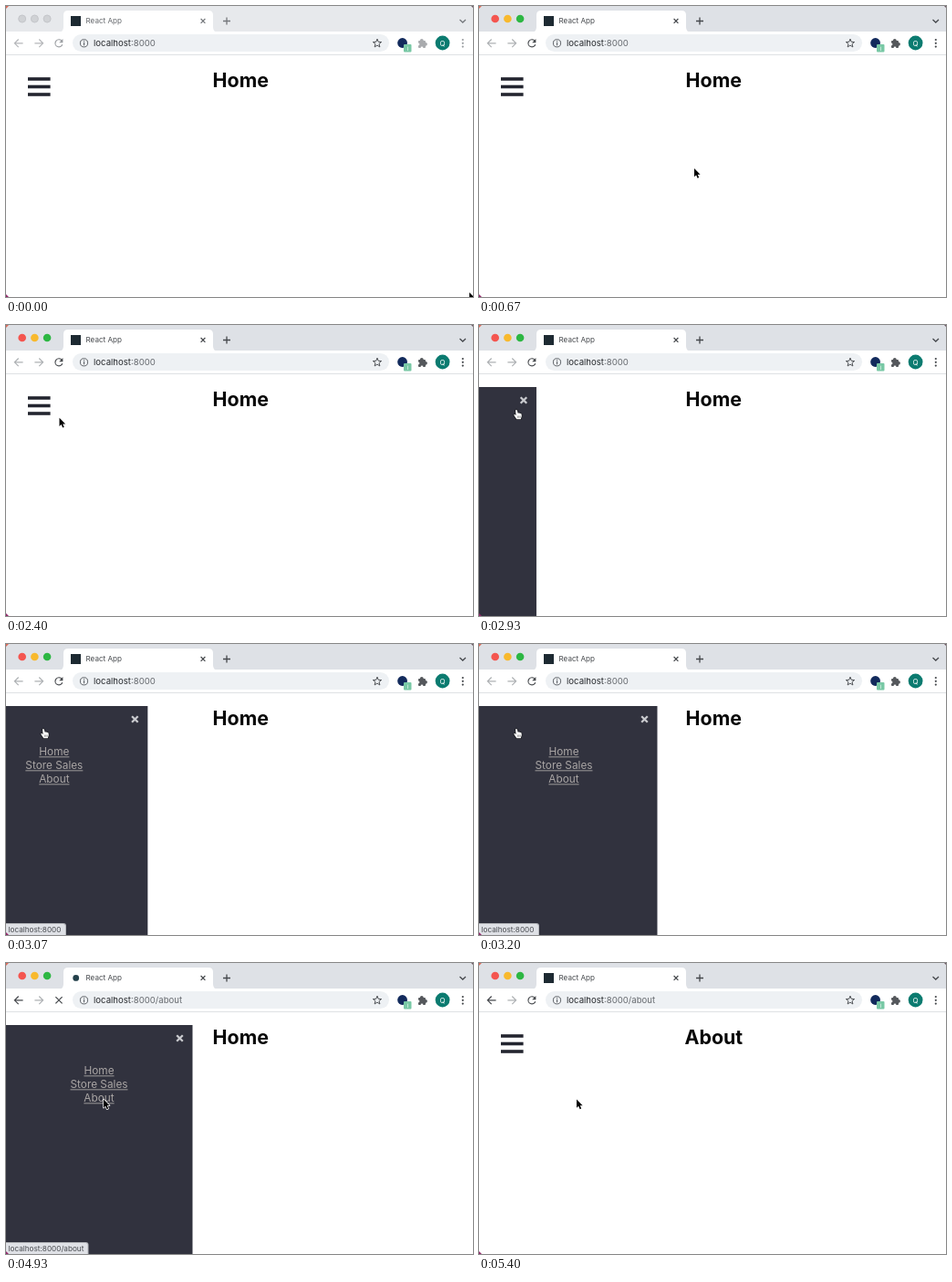
Animation of 512x319 px, one loop 6 s. Source, as an HTML page with a canvas:

```html
<!DOCTYPE html>
<html lang="en">
<head>
<meta charset="utf-8">
<title>Sidebar menu demo</title>
<style>
html, body { margin: 0; width: 100%; height: 100%; overflow: hidden; background: #fff; }
canvas { display: block; width: 512px; height: 319px; }
</style>
</head>
<body>
<canvas id="stage"></canvas>
<script>
const W = 512, H = 319, LOOP = 6000, STEP = 1000 / 15;
const FONT = 'Inter, "Open Sans", sans-serif';
const canvas = document.getElementById('stage');
const ctx = canvas.getContext('2d');
const dpr = window.devicePixelRatio || 1;
canvas.width = W * dpr;
canvas.height = H * dpr;

// Key times of the scene, in ms
const ACTIVE = 400, MENU_START = 2645, MENU_TIME = 670;
const CLICK = 4790, NAVIGATED = 4860, LOADED = 5130;

// Cursor stops: time, x, y of the hotspot
const cursorPath = [
  [267, 508, 314], [667, 236, 178], [1067, 236, 178], [1400, 210, 178],
  [1867, 210, 178], [2533, 41, 93], [3667, 41, 93], [3867, 105, 154],
  [4000, 107, 121], [4133, 107, 121], [4400, 107, 149.5], [6000, 107, 149.5]
];

// CSS "ease" curve
function ease(x) {
  if (x <= 0) return 0;
  if (x >= 1) return 1;
  let lo = 0, hi = 1;
  for (let i = 0; i < 24; i++) {
    const s = (lo + hi) / 2;
    if (0.75 * s * (1 - s) + s ** 3 < x) lo = s; else hi = s;
  }
  return 0.3 * lo * (1 - lo) ** 2 + 3 * lo * lo * (1 - lo) + lo ** 3;
}

function cursorAt(t) {
  if (t <= cursorPath[0][0]) return cursorPath[0].slice(1);
  const i = cursorPath.findIndex(stop => stop[0] >= t);
  const [t0, x0, y0] = cursorPath[i - 1], [t1, x1, y1] = cursorPath[i];
  const p = (t - t0) / (t1 - t0), k = p * p * (3 - 2 * p);
  return [x0 + (x1 - x0) * k, y0 + (y1 - y0) * k];
}

function rect(x, y, w, h, fill) {
  ctx.fillStyle = fill;
  ctx.fillRect(x, y, w, h);
}

function disc(x, y, r, fill) {
  ctx.beginPath();
  ctx.arc(x, y, r, 0, Math.PI * 2);
  ctx.fillStyle = fill;
  ctx.fill();
}

function ring(x, y, r, color, width) {
  ctx.beginPath();
  ctx.arc(x, y, r, 0, Math.PI * 2);
  ctx.strokeStyle = color;
  ctx.lineWidth = width;
  ctx.stroke();
}

function pill(x, y, w, h, radii, fill) {
  ctx.beginPath();
  ctx.roundRect(x, y, w, h, radii);
  ctx.fillStyle = fill;
  ctx.fill();
}

function lines(color, width, ...polylines) {
  ctx.strokeStyle = color;
  ctx.lineWidth = width;
  ctx.beginPath();
  for (const p of polylines)
    for (let i = 0; i < p.length; i += 2)
      i ? ctx.lineTo(p[i], p[i + 1]) : ctx.moveTo(p[0], p[1]);
  ctx.stroke();
}

function cross(x, y, r, color, width) {
  lines(color, width, [x - r, y - r, x + r, y + r], [x - r, y + r, x + r, y - r]);
}

function text(str, x, y, size, color, align = 'left', weight = 400) {
  ctx.font = `${weight} ${size}px ${FONT}`;
  ctx.textAlign = align;
  ctx.fillStyle = color;
  ctx.fillText(str, x, y);
  return ctx.measureText(str).width;
}

function drawTabStrip(active, loading) {
  rect(0, 0, W, 28, active ? '#dee1e6' : '#e7e9ec');
  const lights = active ? ['#f4554f', '#f8b92d', '#2db743'] : ['#d0d2d5', '#d0d2d5', '#d0d2d5'];
  lights.forEach((color, i) => {
    disc(17.7 + i * 13.7, 14, 4.3, color);
    if (!active) ring(17.7 + i * 13.7, 14, 4, '#bfc1c4', 0.7);
  });

  ctx.fillStyle = '#fff';
  ctx.beginPath();
  ctx.moveTo(58, 28.5);
  ctx.quadraticCurveTo(63, 28.5, 63, 23);
  ctx.lineTo(63, 10);
  ctx.quadraticCurveTo(63, 5, 68, 5);
  ctx.lineTo(222, 5);
  ctx.quadraticCurveTo(227, 5, 227, 10);
  ctx.lineTo(227, 23);
  ctx.quadraticCurveTo(227, 28.5, 232, 28.5);
  ctx.fill();

  if (loading) disc(76.7, 16.4, 3.4, '#24414b');
  else rect(71, 11, 11, 11, '#1d2a32');
  text('React App', 87.5, 19.4, 8.1, active ? '#45484c' : '#65686c');

  const ink = active ? '#45484c' : '#75787c';
  cross(216, 16.4, 2.4, ink, 1.2);
  lines(ink, 1.3, [238, 16.5, 246, 16.5], [242, 12.5, 242, 20.5]);
  lines(ink, 1.3, [497.5, 15, 500.8, 18, 504, 15]);
}

function arrowIcon(x, dir, color) {
  lines(color, 1.2, [x - 4.6 * dir, 40.8, x + 4.3 * dir, 40.8],
    [x + 0.3 * dir, 36.5, x + 4.6 * dir, 40.8, x + 0.3 * dir, 45.1]);
}

function drawReload(color) {
  ctx.strokeStyle = color;
  ctx.lineWidth = 1.2;
  ctx.beginPath();
  ctx.arc(58, 40.8, 4, 0.35, 5.5);
  ctx.stroke();
  ctx.fillStyle = color;
  ctx.beginPath();
  ctx.moveTo(62.4, 36);
  ctx.lineTo(62.4, 40.2);
  ctx.lineTo(58.2, 40.2);
  ctx.fill();
}

function drawStar(x, y, color) {
  const points = [];
  for (let i = 0; i <= 10; i++) {
    const r = i % 2 ? 2.1 : 4.9, a = i * Math.PI / 5 - Math.PI / 2;
    points.push(x + r * Math.cos(a), y + r * Math.sin(a));
  }
  lines(color, 1, points);
}

function drawPuzzle(color) {
  pill(452, 38, 8, 8, 1, color);
  disc(455.8, 37.8, 1.9, color);
  disc(460, 41.8, 1.9, color);
  disc(452, 42, 1.4, '#fff');
  disc(456, 46, 1.4, '#fff');
}

function drawToolbar(active, loading, path) {
  rect(0, 28, W, 25, '#fff');
  rect(0, 53, W, 1, '#dfe1e4');
  const ink = active ? '#45484c' : '#9b9ea2', faded = active ? '#aeb1b4' : '#b5b7ba';
  arrowIcon(14, -1, path ? ink : faded);
  arrowIcon(36, 1, faded);
  if (loading) cross(58, 40.8, 3.6, ink, 1.2);
  else drawReload(ink);

  pill(73, 31, 347, 19, 9.5, '#eef1f4');
  ring(85.5, 40.8, 4.1, '#5f6368', 1);
  rect(85, 40, 1.1, 3.2, '#5f6368');
  rect(85, 38.2, 1.1, 1.1, '#5f6368');
  const hostWidth = text('localhost', 96, 44.2, 9.6, '#25282c');
  text(':8000' + path, 96 + hostWidth, 44.2, 9.6, '#65696e');
  drawStar(407, 41, '#505357');

  disc(434.6, 40.5, 5.4, '#122a5c');
  pill(436, 42, 8.5, 8.5, 1, '#78c8a5');
  text('i', 440.2, 48.7, 6.5, '#fff', 'center');
  drawPuzzle(active ? '#55585c' : '#a9abae');
  disc(478.6, 40.5, 7.9, '#0b7b70');
  text('Q', 478.6, 43.5, 8, '#fff', 'center');
  for (const y of [37, 40.8, 44.6]) disc(500.8, y, 1.1, ink);
}

function drawPage(title) {
  for (const y of [78.2, 86.7, 95.2]) rect(24, y, 24.6, 3.6, '#23252f');
  text(title, 257.3, 89.4, 21.4, '#080808', 'center', 700);
}

function drawMenu(left) {
  if (left <= -205) return;
  ctx.save();
  ctx.translate(left, 0);
  rect(0, 68, 204.5, H - 68, '#31323e');
  cross(190.5, 82.5, 3.3, '#c9cace', 2.3);
  ['Home', 'Store Sales', 'About'].forEach((label, i) => {
    const y = 122.2 + i * 15;
    const width = text(label, 102, y, 11.8, '#aaa6a5', 'center');
    rect(102 - width / 2, y + 1.2, width, 0.9, '#aaa6a5');
  });
  ctx.restore();
}

function drawStatus(t) {
  if (t < 3060 || t >= 5390) return;
  const onAbout = (t > 3860 && t < 3990) || t > 4320;
  ctx.globalAlpha = Math.min(1, (5400 - t) / 200);
  const width = onAbout ? 90.5 : 66;
  pill(-2, 306, width + 2, 16, [0, 3, 0, 0], '#b3b5ba');
  pill(-2, 307, width + 1, 16, [0, 2.5, 0, 0], '#dfe1e6');
  text('localhost:8000' + (onAbout ? '/about' : ''), 2.5, 315.8, 8.2, '#484b50');
  ctx.globalAlpha = 1;
}

function shape(points, fill, stroke, width) {
  ctx.beginPath();
  for (let i = 0; i < points.length; i += 2) ctx.lineTo(points[i], points[i + 1]);
  ctx.closePath();
  ctx.strokeStyle = stroke;
  ctx.lineWidth = width;
  ctx.stroke();
  ctx.fillStyle = fill;
  ctx.fill();
}

function drawCursor(t) {
  const [x, y] = cursorAt(t);
  const overButton = t > 2300 && x < 50 && y < 101;
  const overLink = t > 3850 && t < CLICK;
  ctx.save();
  ctx.translate(x, y);
  ctx.lineJoin = 'round';
  if (overButton || overLink) {
    shape([-1, 0.6, 0, 0, 1, 0.8, 1.5, 3.6, 3, 3.4, 4.5, 4.1, 5.6, 4.6, 5.8, 7, 4.8, 10.3,
      0.2, 10.3, -1.6, 7.6, -2.9, 5.6, -1.8, 5.1, -0.4, 6.1], '#fff', '#17181c', 1.4);
    lines('#333', 0.5, [1.3, 6.6, 1.3, 8.8], [2.8, 6.6, 2.8, 8.8], [4.2, 6.6, 4.2, 8.8]);
  } else {
    shape([0, 0, 0, 9.3, 2.1, 7.3, 3.6, 10.8, 5.2, 10.1, 3.7, 6.8, 6.6, 6.8], '#000', '#fff', 1.4);
  }
  ctx.restore();
}

function drawCorners() {
  ctx.lineJoin = 'miter';
  const corner = (x, y, dx, dy, color) => {
    ctx.fillStyle = color;
    ctx.beginPath();
    ctx.moveTo(x, y);
    ctx.lineTo(x + dx, y);
    ctx.lineTo(x, y + dy);
    ctx.fill();
  };
  corner(0, 0, 3, 3, '#dc6a58');
  corner(W, 0, -2, 2, '#6b5560');
  corner(0, H, 3, -3, '#92246a');
}

function draw(t) {
  const active = t >= ACTIVE - 5;
  const loading = t >= CLICK && t < LOADED;
  const loaded = t >= LOADED;
  ctx.setTransform(dpr, 0, 0, dpr, 0, 0);
  rect(0, 0, W, H, '#fff');
  drawTabStrip(active, loading);
  drawToolbar(active, loading, t >= NAVIGATED ? '/about' : '');
  drawPage(loaded ? 'About' : 'Home');
  if (!loaded) drawMenu(-W * (1 - ease((t - MENU_START) / MENU_TIME)));
  drawStatus(t);
  drawCursor(t);
  drawCorners();
}

const start = performance.now();
function tick() {
  const t = (performance.now() - start) % LOOP;
  draw(Math.min(Math.floor((t + 6) / STEP) * STEP, LOOP - 1));
  requestAnimationFrame(tick);
}
tick();
</script>
</body>
</html>
```
